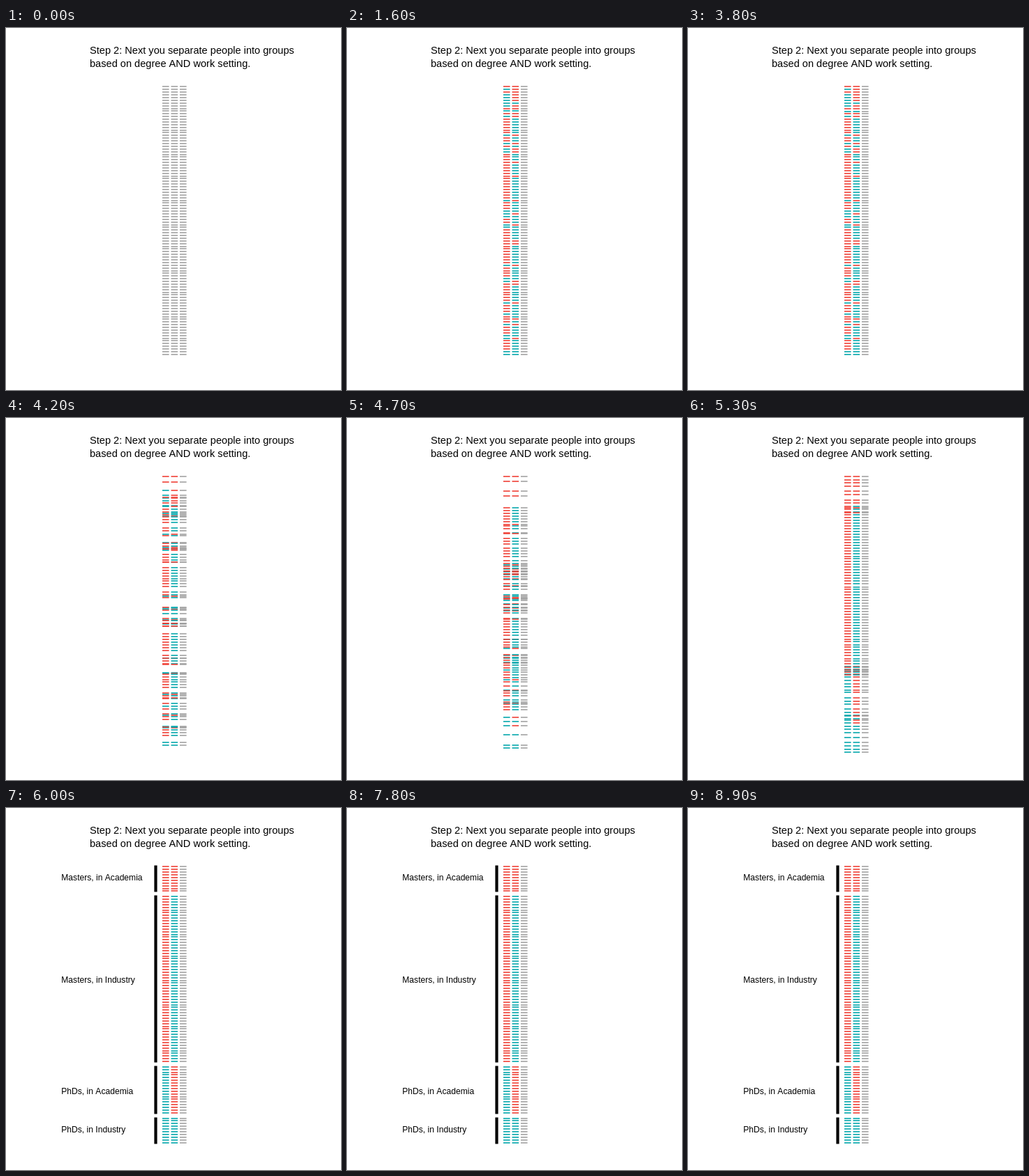
Write an HTML page with a canvas that moves like this. It is 480 px wide and 520 px high and loops after 9000 ms.

```html
<!DOCTYPE html>
<html lang="en">
<head>
<meta charset="utf-8">
<title>Separate people into groups</title>
<style>
  html, body { margin: 0; width: 100%; height: 100%; overflow: hidden; background: #fff; }
  canvas { display: block; }
</style>
</head>
<body>
<canvas id="stage" width="480" height="520"></canvas>
<script>
const ctx = document.getElementById('stage').getContext('2d');
const LOOP = 9000, STEP = 100;
const ROWS = 100, TOP = 83.95, PITCH = 3.8835;
const COLS = [224, 236.5, 249], DASH_W = 9.6, DASH_H = 2;
const GRAY = [160, 160, 160], RED = [239, 60, 51], TEAL = [0, 165, 170];
const FONT = '"Liberation Sans", Arial, sans-serif';

// Starting rows of each group; the remaining rows are masters in industry.
const groups = [
  { label: 'Masters, in Academia', colors: [RED, RED], baseline: 104,
    rows: [0, 2, 8, 10, 28, 33, 57, 58, 73, 86] },
  { label: 'Masters, in Industry', colors: [RED, TEAL], baseline: 251, rows: [] },
  { label: 'PhDs, in Academia', colors: [TEAL, RED], baseline: 411,
    rows: [1, 3, 4, 5, 7, 11, 18, 21, 23, 24, 42, 47, 51, 66, 72, 80, 88, 93] },
  { label: 'PhDs, in Industry', colors: [TEAL, TEAL], baseline: 466,
    rows: [6, 9, 46, 48, 52, 71, 84, 92, 98, 99] }
];
const taken = new Set(groups.flatMap(g => g.rows));
for (let i = 0; i < ROWS; i++) if (!taken.has(i)) groups[1].rows.push(i);

// Sorted slots, with one empty slot between groups.
const people = [];
let slot = 0;
for (const g of groups) {
  g.first = slot;
  for (const from of g.rows) people.push({ from, to: slot++, colors: [...g.colors, GRAY] });
  g.last = slot - 1;
  slot++;
}
people.sort((a, b) => a.from - b.from);

const rowY = s => Math.floor(TOP + PITCH * s + 1e-6);
const mix = (a, b, p) => a + (b - a) * p;

function ease(t, start, end) {
  const x = Math.min(1, Math.max(0, (t - start) / (end - start)));
  return x < 0.5 ? 4 * x ** 3 : 1 - 4 * (1 - x) ** 3;
}

function text(str, x, y, size) {
  ctx.font = `${size}px ${FONT}`;
  ctx.fillText(str, x, y);
}

function drawPeople(t) {
  const tint = ease(t, 0, 1600), move = ease(t, 3700, 5800);
  ctx.globalAlpha = 0.8;
  for (const p of people) {
    const y = rowY(mix(p.from, p.to, move));
    p.colors.forEach((color, i) => {
      const rgb = GRAY.map((v, k) => Math.round(mix(v, color[k], tint)));
      ctx.fillStyle = `rgb(${rgb})`;
      ctx.fillRect(COLS[i], y, DASH_W, DASH_H);
    });
  }
  ctx.globalAlpha = 1;
}

function drawGroups() {
  ctx.fillStyle = '#000';
  for (const g of groups) {
    const y = rowY(g.first) - 0.5;
    ctx.fillRect(212.4, y, 4.2, rowY(g.last) + DASH_H + 0.5 - y);
    text(g.label, 79.3, g.baseline, 12.1);
  }
}

function draw(now) {
  const t = Math.floor((now % LOOP) / STEP) * STEP;
  ctx.fillStyle = '#fff';
  ctx.fillRect(0, 0, 480, 520);
  ctx.fillStyle = '#000';
  text('Step 2: Next you separate people into groups', 120, 37, 14.6);
  text('based on degree AND work setting.', 120, 56, 14.6);
  drawPeople(t);
  if (t >= 6000) drawGroups();
}

const start = performance.now();
function tick() {
  draw(performance.now() - start);
  requestAnimationFrame(tick);
}
tick();
</script>
</body>
</html>
```
